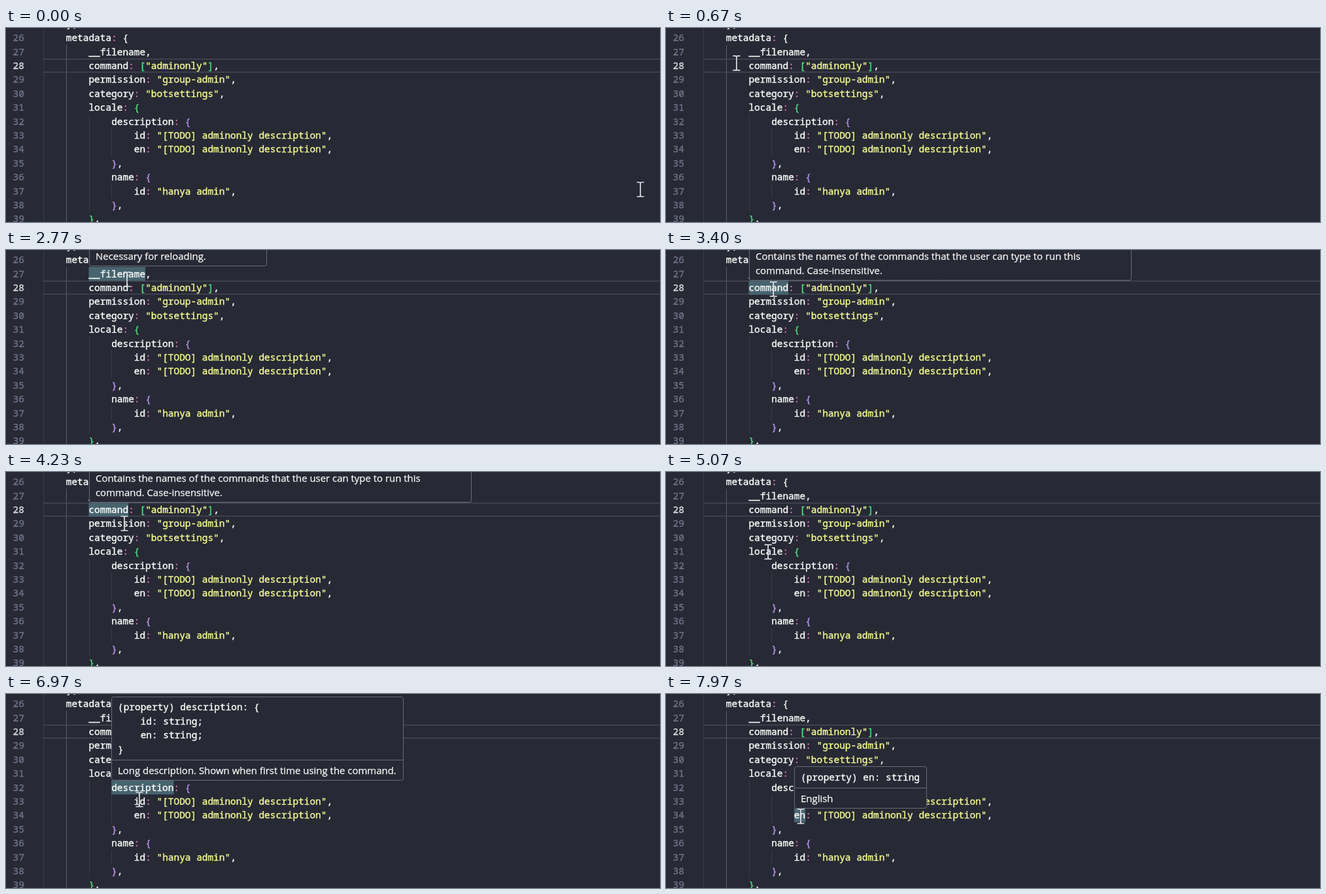
An HTML page with a canvas that plays this animation: 1000 by 298 pixels, repeating every 8000 ms.

```html
<!DOCTYPE html>
<html lang="en">
<head>
<meta charset="utf-8">
<title>Editor hover hints</title>
<style>
  html, body { margin: 0; width: 100%; height: 100%; overflow: hidden; background: #272935; }
  canvas { display: block; }
</style>
</head>
<body>
<canvas id="stage" width="1000" height="298"></canvas>
<script>
const ctx = document.getElementById("stage").getContext("2d");
const LOOP = 8000, CHAR = 8.67, PITCH = 21.4, FIRST = 26, LEFT = 57.1;
const MONO = '14.45px "Noto Sans Mono", monospace';
const SANS = '14.95px "Open Sans", sans-serif';
const color = {
  bg: "#272935", text: "#fbfbf8", string: "#f3fa8f", pink: "#e276b5",
  green: "#50e67b", purple: "#b794ef", number: "#6f7386", current: "#dcdde0",
  guide: "#3a3c48", activeGuide: "#5b5d68", lineBox: "#464855",
  highlight: "#47646f", border: "#696b75", fold: "#30323e"
};
const brackets = [color.text, color.green, color.purple];

const code = `    metadata: {
        __filename,
        command: ["adminonly"],
        permission: "group-admin",
        category: "botsettings",
        locale: {
            description: {
                id: "[TODO] adminonly description",
                en: "[TODO] adminonly description",
            },
            name: {
                id: "hanya admin",
            },
        },`.split("\n");

// Each hint: visible span, box, highlighted word, type lines and a description.
const hints = [
  { from: 1230, to: 1760, x: 92, right: 1010, bottom: 3, row: 0, col: 4, len: 8 },
  { from: 2190, to: 3080, x: 127, right: 398, bottom: 25, row: 1, col: 8, len: 10,
    notes: ["Necessary for reloading."] },
  { from: 3260, to: 4330, x: 127, right: 711, bottom: 47, row: 2, col: 8, len: 7,
    notes: ["Contains the names of the commands that the user can type to run this",
            "command. Case-insensitive."] },
  { from: 5380, to: 6150, x: 127, right: 424, bottom: 111, row: 5, col: 8, len: 6,
    types: ["        id?: string | undefined;", "        en?: string | undefined;",
            "    } | undefined;", "}"],
    notes: ["Command description."] },
  { from: 6550, to: 7280, x: 161, right: 607, top: 4, bottom: 133, row: 6, col: 12, len: 11,
    types: ["(property) description: {", "    id: string;", "    en: string;", "}"],
    notes: ["Long description. Shown when first time using the command."] },
  { from: 7830, to: 8000, x: 196, right: 398, top: 111, bottom: 176, row: 8, col: 16, len: 2,
    types: ["(property) en: string"], notes: ["English"] }
];

// Pointer path: time, x, y.
const path = [
  [0, 970, 248], [420, 430, 122], [760, 42, 40], [850, 36, 30], [1080, 128, 18],
  [1400, 141, 20], [1500, 142, 25], [1700, 148, 30], [2100, 185, 43], [2330, 185, 45],
  [2770, 185, 45], [3100, 166, 58], [3370, 164, 60], [3600, 168, 63], [3770, 168, 63],
  [4230, 181, 79], [4700, 164, 102], [5100, 156, 123], [5730, 156, 125], [6050, 170, 130],
  [6400, 202, 146], [6970, 204, 162], [7200, 204, 166], [7560, 206, 186], [7970, 206, 188], [8000, 206, 188]
];

const rowMid = i => 15.2 + PITCH * i;
const colX = c => LEFT + CHAR * c;

function rect(x, y, w, h, fill) {
  ctx.fillStyle = fill;
  ctx.fillRect(x, y, w, h);
}

// A thin outline gives the strokes a medium weight.
function write(text, x, y, fill, font = MONO, weight = 0.4) {
  ctx.font = font;
  ctx.fillStyle = ctx.strokeStyle = fill;
  ctx.lineWidth = weight;
  ctx.fillText(text, x, y);
  ctx.strokeText(text, x, y);
}

function drawGuides() {
  rect(57, 0, 1, 298, color.guide);
  rect(92, rowMid(1) - 10.7, 1, 298, color.activeGuide);
  rect(127, rowMid(6) - 10.7, 1, PITCH * 7, color.guide);
  rect(161, rowMid(7) - 10.7, 1, PITCH * 2, color.guide);
  rect(161, rowMid(11) - 10.7, 1, PITCH, color.guide);
  rect(57, 47, 943, 1.5, color.lineBox);
  rect(57, 67, 943, 1.5, color.lineBox);
}

function drawFolds() {
  ctx.strokeStyle = color.fold;
  ctx.lineWidth = 1;
  for (const row of [0, 5, 6, 10]) {
    const y = rowMid(row);
    ctx.beginPath();
    ctx.moveTo(42, y - 1);
    ctx.lineTo(45.5, y + 2);
    ctx.lineTo(49, y - 1);
    ctx.stroke();
  }
}

function drawCode() {
  let depth = 0;
  write("},", 92, -1, color.text);
  code.forEach((line, i) => {
    const y = rowMid(i) + 5;
    write(String(FIRST + i), 10.5, y, i === 2 ? color.current : color.number);
    for (const match of line.matchAll(/"[^"]*"|[{}[\]:]|[^\s"{}[\]:]+/g)) {
      const token = match[0];
      let fill = color.text;
      if (token[0] === '"') fill = color.string;
      else if (token === ":") fill = color.pink;
      else if ("{[".includes(token)) fill = brackets[depth++];
      else if ("}]".includes(token)) fill = brackets[--depth];
      write(token, colX(match.index), y, fill);
    }
  });
}

function drawTypeLine(line, x, y) {
  for (const { 0: token, index } of line.matchAll(/undefined|\||[^\s|]+/g)) {
    const fill = token === "undefined" ? color.purple : token === "|" ? color.pink : color.text;
    write(token, x + index * CHAR, y, fill);
  }
}

function drawHint(hint) {
  const { x, right, bottom, top = -80, types = [], notes = [] } = hint;
  ctx.beginPath();
  ctx.roundRect(x + 0.5, top + 0.5, right - x, bottom - top - 1, 3);
  ctx.fillStyle = color.bg;
  ctx.fill();
  ctx.strokeStyle = color.border;
  ctx.lineWidth = 1;
  ctx.stroke();
  notes.forEach((note, i) =>
    write(note, x + 10, bottom - 10.5 - PITCH * (notes.length - 1 - i), color.text, SANS, 0.25));
  if (!types.length) return;
  const divider = bottom - 32;
  rect(x, divider, right - x, 1, color.border);
  types.forEach((line, i) =>
    drawTypeLine(line, x + 10, divider - 11.5 - PITCH * (types.length - 1 - i)));
}

function pointerAt(t) {
  const i = path.findIndex(p => p[0] > t);
  const [t0, x0, y0] = path[i - 1], [t1, x1, y1] = path[i];
  const u = (t - t0) / (t1 - t0), k = u * u * (3 - 2 * u);
  return [x0 + (x1 - x0) * k, y0 + (y1 - y0) * k];
}

function drawPointer(x, y) {
  ctx.beginPath();
  for (const s of [-1, 1]) {
    ctx.moveTo(x - 5.5, y + 11 * s);
    ctx.lineTo(x - 2, y + 11 * s);
    ctx.quadraticCurveTo(x, y + 11 * s, x, y + 9 * s);
    ctx.quadraticCurveTo(x, y + 11 * s, x + 2, y + 11 * s);
    ctx.lineTo(x + 5.5, y + 11 * s);
  }
  ctx.moveTo(x, y - 9.5);
  ctx.lineTo(x, y + 9.5);
  ctx.strokeStyle = "#e0e0e3";
  ctx.lineWidth = 1.7;
  ctx.stroke();
}

function draw(t) {
  rect(0, 0, 1000, 298, color.bg);
  drawGuides();
  if (t > 780) drawFolds();
  const hint = hints.find(h => t >= h.from && t < h.to);
  const alpha = hint ? Math.min(1, (t - hint.from) / 100) : 0;
  if (hint) {
    ctx.globalAlpha = alpha;
    rect(colX(hint.col), rowMid(hint.row) - 10.7, hint.len * CHAR, PITCH, color.highlight);
    ctx.globalAlpha = 1;
  }
  drawCode();
  if (hint) {
    ctx.globalAlpha = alpha;
    drawHint(hint);
    ctx.globalAlpha = 1;
  }
  drawPointer(...pointerAt(t));
}

const start = performance.now();
function tick() {
  draw((performance.now() - start) % LOOP);
  requestAnimationFrame(tick);
}
tick();
</script>
</body>
</html>
```
